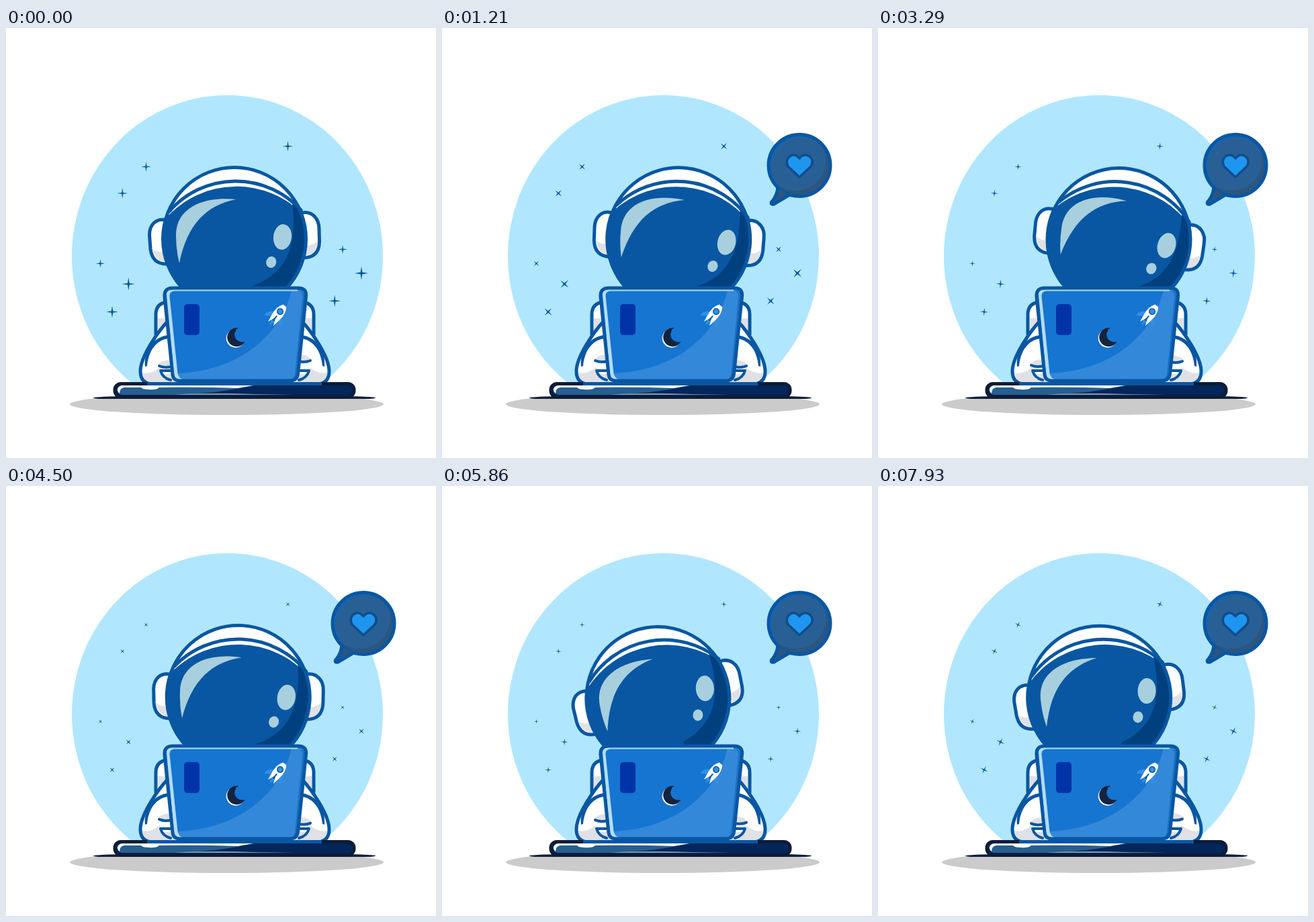
An HTML page that plays this animation: 640x640 px, repeating every 8000 ms.

```html
<!DOCTYPE html>
<html lang="en">
<head>
<meta charset="utf-8">
<title>Astronaut at a laptop</title>
<style>
  html, body { margin: 0; width: 100%; height: 100%; overflow: hidden; background: #fff; }
  svg { display: block; width: 100%; height: 100%; }
  .line { stroke: #0957a2; stroke-width: 5; stroke-linecap: round; stroke-linejoin: round; }
  .thin { stroke-width: 4; }
  .white { fill: #fff; }
  .shade { fill: #dfe1e6; }
  .glass { fill: #a8cfde; }
  .none { fill: none; }
</style>
</head>
<body>
<svg viewBox="0 0 640 640">
  <defs>
    <clipPath id="skyClip"><path d="M0 0H640V540H0Z"/></clipPath>
    <clipPath id="floorClip"><path d="M0 550H640V640H0Z"/></clipPath>
    <clipPath id="helmetClip"><circle cx="340" cy="314" r="107"/></clipPath>
    <clipPath id="bubbleClip"><circle cx="532" cy="204.500" r="46"/></clipPath>

    <g id="arm">
      <path class="white line" d="M243 407Q223 409 223 426V456H243Z"/>
      <path class="shade" d="M226 432H242V450H226Z"/>
      <path class="white line" d="M241 436C228 450 200 488 200 511Q200 530 220 530H262V436Z"/>
      <path class="shade" d="M203 513Q216 516 229 505L252 527.500H220Q204 527 203 513Z"/>
      <path d="M207 504C205 484 216 460 242 457V462C222 465 212 482 210 503Z" fill="#0957a2"/>
    </g>
    <g id="finger">
      <path class="shade" d="M226 495Q234 484 250 489V500Q236 503 226 495Z"/>
      <path class="line thin none" d="M228 496Q237 500 250 496"/>
    </g>
    <g id="cuff">
      <path class="white" d="M230 509H254V526H246Q232 521 230 509Z"/>
      <path class="shade" d="M235 515H254V526H246Q238 522 235 515Z"/>
      <path class="line thin none" d="M252 510H230Q233 521 245 524"/>
    </g>
  </defs>

  <ellipse cx="329.500" cy="339.500" rx="231.500" ry="239.500" fill="#b0e7fe" clip-path="url(#skyClip)"/>
  <ellipse cx="328.500" cy="560" rx="233.500" ry="16" fill="#cbcbcb" clip-path="url(#floorClip)"/>
  <g id="stars" fill="#0957a2"></g>

  <g id="head">
    <g class="line white">
      <path d="M240 286C222 282 213.500 294 213.500 308L215 329Q218 353 242 351Z"/>
      <path d="M440 275C456 272 466 284 466 299L466.500 318Q466 342 442 342Z"/>
    </g>
    <path class="shade" d="M218 329Q226 335 240 333V348.500Q222 348 218 329Z"/>
    <path class="shade" d="M463.500 316Q458 324 443 325V339.500Q463 339 463.500 316Z"/>
    <circle class="white" cx="340" cy="314" r="107"/>
    <g clip-path="url(#helmetClip)">
      <path d="M239 282A140 140 0 0 1 443 278L460 430H220V284Z" fill="#0957a2"/>
      <path d="M426 260C433 320 422 364 366 384L380 430H460V290Z" fill="#01407f"/>
    </g>
    <path class="line none" d="M243 273A131 131 0 0 1 439 271"/>
    <circle class="line none" cx="340" cy="314" r="106.500"/>
    <path class="glass" d="M342 255C290 250 252 270 253 310Q253 330 258 350C270 292 298 264 342 255Z"/>
    <ellipse class="glass" cx="411.500" cy="311" rx="13.500" ry="19" transform="rotate(7 411.500 311)"/>
    <ellipse class="glass" cx="394.700" cy="348.500" rx="7.500" ry="8.500" transform="rotate(15 394.700 348.500)"/>
  </g>

  <g>
    <use href="#arm"/>
    <use href="#finger" id="leftFinger"/>
    <use href="#cuff"/>
  </g>
  <g transform="translate(681 0) scale(-1 1)">
    <use href="#arm"/>
    <use href="#finger" id="rightFinger"/>
    <use href="#cuff"/>
  </g>

  <!-- table top -->
  <path d="M130 550Q150 547.500 200 548H480Q535 547.500 550 550Q550 552 535 552H145Q130 552 130 550Z" fill="#10203c"/>
  <rect x="162" y="529.500" width="356" height="19.500" rx="9" fill="#03265c" stroke="#0d1c38" stroke-width="5"/>
  <path d="M174 532H370Q310 545 250 546H174Q166 546 166 539T174 532Z" fill="#265e90"/>
  <path d="M174 532H368L345 536Q290 534 228 535Q224 539 212 538Q203 538 201 535H176Q169 536 169 544Q165 541 166 537Q168 532 174 532Z" fill="#fff"/>
  <path d="M250 546Q300 542 370 545L430 546Z" fill="#eaf3fa" opacity=".55"/>
  <path d="M210 527H470V532H210Z" fill="#0957a2"/>

  <!-- laptop lid -->
  <path id="lid" d="M248 387H435Q448 387 446.500 400L434.500 515Q433 525 423 525H258Q249 525 248 516L236 400Q235 387 248 387Z" fill="#1575d1"/>
  <path d="M425 390C410 455 350 510 256 514Q256 523 263 523H423Q432 523 433 515L445 400Q446 390 435 390Z" fill="#3488d9"/>
  <path d="M239 397Q239 389 248 389H434V391.500H251Q243 392 243.500 399L255.500 514Q257 521 263 523H258Q251 522 250 515Z" fill="#b4ddf8"/>
  <path d="M436 391Q442 393 441 401L430 515Q429 522 422 523H424Q432 522 433 514L445 400Q445 391 436 391Z" fill="#1b73c6"/>
  <use href="#lid" class="line" style="fill-opacity:0"/>
  <rect x="265" y="411" width="23" height="46" rx="5" fill="#0033a8"/>
  <path id="moon" d="M346 446.500A14 14 0 1 0 355.500 467C341 470 335 454 346 446.500Z" fill="#fff" transform="translate(-1.500 1.500)"/>
  <path d="M346 446.500A14 14 0 1 0 355.500 467C341 470 335 454 346 446.500Z" fill="#14233f"/>
  <g transform="translate(405 426) rotate(38)">
    <path d="M-7 0Q-17 6 -15 14L-7 9ZM7 0Q17 6 15 14L7 9ZM-3 12H3L0 21Z" fill="#358edf"/>
    <path class="white" d="M-3 -16H3Q9 -8 7 6L5 18L1 8H-1L-5 18L-7 6Q-9 -8 -3 -16Z"/>
    <circle cy="-5" r="4.300" fill="#358edf" stroke="#0957a2" stroke-width="1.500"/>
    <path d="M0 3V12" stroke="#0957a2" stroke-width="2"/>
  </g>

  <g id="bubble">
    <path class="line" d="M500 236Q499 250 490.500 259Q489 263 494 262L516 249Z" fill="#2c567f"/>
    <circle cx="532" cy="204.500" r="46" fill="#2c567f"/>
    <g clip-path="url(#bubbleClip)">
      <circle cx="526" cy="196.500" r="45.500" fill="#286096"/>
      <circle cx="534" cy="206.500" r="46" fill="none" stroke="#1265b8" stroke-width="4"/>
      <path d="M574 180A46 46 0 0 1 508 246" fill="none" stroke="#2c567f" stroke-width="8"/>
    </g>
    <circle class="line none" cx="532" cy="204.500" r="46"/>
    <path d="M503 240L514 247L507 251L501 249Z" fill="#2c567f"/>
    <path d="M532 222L515 206C508 194 523 182 532 194C541 182 557 194 549 206Z" fill="#1e96f0" stroke="#0f4d8c" stroke-width="3.500" stroke-linejoin="round"/>
  </g>
</svg>
<script>
const LOOP = 8000;
const byId = id => document.getElementById(id);
const place = (node, value) => node.setAttribute("transform", value);

// Smooth curve through [time, value] points.
function track(...points) {
  const slope = i => {
    const a = points[Math.max(i - 1, 0)], b = points[Math.min(i + 1, points.length - 1)];
    return (b[1] - a[1]) / (b[0] - a[0]);
  };
  return t => {
    let i = 0;
    while (i < points.length - 2 && t > points[i + 1][0]) i++;
    const [t0, v0] = points[i], [t1, v1] = points[i + 1];
    const d = t1 - t0, u = (t - t0) / d, w = 1 - u;
    return w * w * ((1 + 2 * u) * v0 + u * d * slope(i))
         + u * u * ((1 + 2 * w) * v1 - w * d * slope(i + 1));
  };
}

const headAngle = track([0, 0], [1210, 6.2], [2500, 9.2], [3290, 9.4], [4500, 2.9],
  [5210, -7], [6100, -9.9], [6790, -9.6], [7930, -5.5]);
const starAngle = track([0, 0], [1210, 43], [3290, 95], [4500, 135], [5210, 170],
  [6790, 195], [7930, 206]);
const starScale = track([0, 1], [1210, .84], [3290, .68], [4500, .54], [5210, .52],
  [6790, .58], [7930, .67]);

const stars = [
  [419.5, 176, 8], [208.5, 206.5, 7.5], [173.3, 246, 8], [140.5, 350.5, 6.5], [182.3, 381, 9.7],
  [158, 422.5, 9], [501, 329.5, 6.8], [529, 365, 10], [489.2, 406.3, 9]
].map(([x, y, size]) => {
  const node = document.createElementNS("http://www.w3.org/2000/svg", "path");
  node.setAttribute("d", "M0-1L.14-.14L1 0L.14 .14L0 1L-.14 .14L-1 0L-.14-.14Z");
  byId("stars").append(node);
  return { node, x, y, size };
});

function draw(now) {
  const t = now % LOOP;
  place(byId("head"), `rotate(${headAngle(t)} 343 427)`);

  for (const { node, x, y, size } of stars)
    place(node, `translate(${x} ${y}) rotate(${starAngle(t)}) scale(${size * starScale(t)})`);

  const u = Math.min(t / 1020, 1);
  const grow = u * u * (3 - 2 * u);
  place(byId("bubble"), `translate(532.5 210) scale(${grow}) translate(-532.5 -210)`);

  const tap = Math.cos(t * Math.PI / 400);
  place(byId("leftFinger"), `translate(0 ${3 + 4 * tap})`);
  place(byId("rightFinger"), `translate(0 ${3 - 4 * tap})`);
  requestAnimationFrame(() => draw(performance.now()));
}
draw(0);
</script>
</body>
</html>
```
